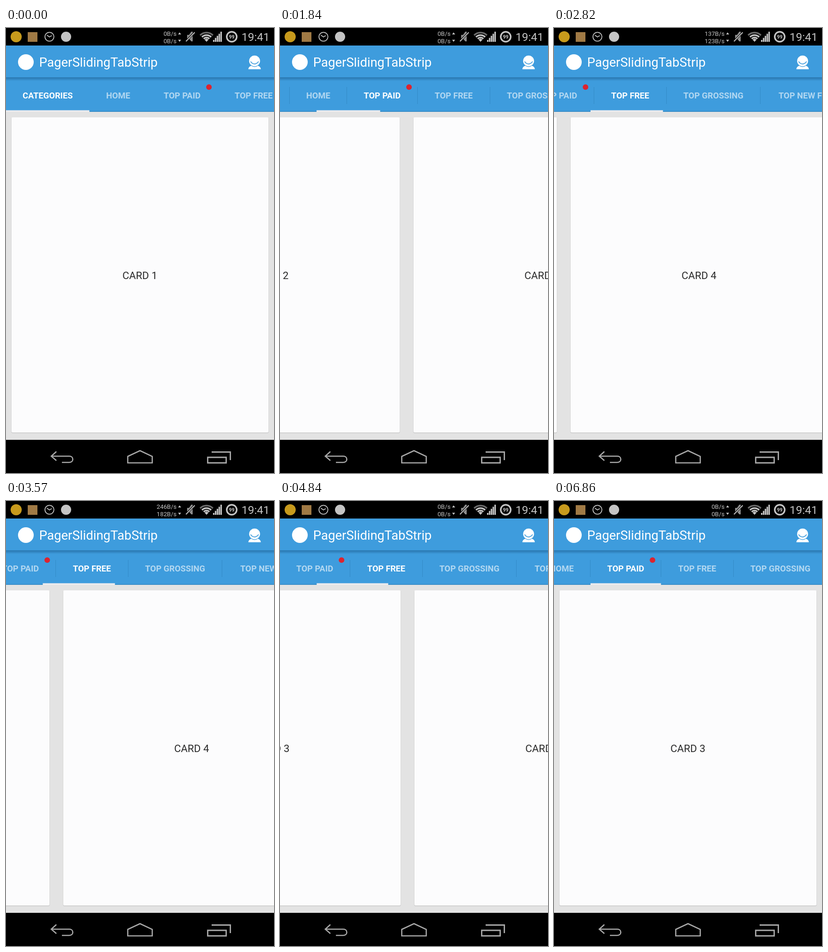
These frames come from a looping animation (580 by 966 pixels, 6920 ms). An HTML page with a canvas:

```html
<!DOCTYPE html>
<html lang="en">
<head>
<meta charset="utf-8">
<title>Sliding tabs</title>
<style>
html, body { margin: 0; width: 100%; height: 100%; overflow: hidden; background: #000; }
canvas { display: block; width: 100%; height: 100%; }
</style>
</head>
<body>
<canvas id="stage" width="580" height="966"></canvas>
<script>
const ctx = document.getElementById('stage').getContext('2d');
const W = 580, LOOP = 6920, PAGE = 586, SETTLE = 720, EDGE = 79, STRIP_LAG = 14;
const BLUE = '#3e9cdd', GREY = '#c4c4c4';
const TABS = [['CATEGORIES', 180.5], ['HOME', 124.5], ['TOP PAID', 152.5], ['TOP FREE', 157],
  ['TOP GROSSING', 203], ['TOP NEW FREE', 205], ['TOP NEW PAID', 205]];
const LEFT = [0];
TABS.forEach(([, w], i) => LEFT.push(LEFT[i] + w));

// Slow drag back from the fourth page: time, page position
const DRAG = [[3230, 3], [3570, 2.809], [4840, 2.524], [5630, 2.387], [6060, 2.312]];

const lerp = (a, b, k) => a + (b - a) * k;
const settle = (t, start) => 1 - Math.pow(1 - Math.min(1, Math.max(0, (t - start) / SETTLE)), 5);

function pageAt(t) {
  if (t < 1740) return settle(t, 1079);
  if (t < 2480) return 1 + settle(t, 1740);
  if (t < DRAG[0][0]) return 2 + settle(t, 2480);
  for (let i = 1; i < DRAG.length; i++) {
    const [t0, p0] = DRAG[i - 1], [t1, p1] = DRAG[i];
    if (t < t1) return lerp(p0, p1, (t - t0) / (t1 - t0));
  }
  return lerp(DRAG[DRAG.length - 1][1], 2, settle(t, 6060));
}

function speedAt(t) {
  if (t < 1900 || t >= 4300) return ['0B/s', '0B/s'];
  return t < 3100 ? ['137B/s', '123B/s'] : ['246B/s', '182B/s'];
}

function rect(x, y, w, h, color) {
  ctx.fillStyle = color;
  ctx.fillRect(x, y, w, h);
}

function circle(x, y, r, color) {
  ctx.fillStyle = color;
  ctx.beginPath();
  ctx.arc(x, y, r, 0, 7);
  ctx.fill();
}

function trace(points, close) {
  ctx.beginPath();
  points.forEach(([x, y]) => ctx.lineTo(x, y));
  if (close) ctx.closePath();
}

function poly(points, color) {
  trace(points, true);
  ctx.fillStyle = color;
  ctx.fill();
}

function line(points, color, width, close) {
  trace(points, close);
  ctx.strokeStyle = color;
  ctx.lineWidth = width;
  ctx.stroke();
}

function text(s, x, y, size, color, align = 'left', weight = 400) {
  ctx.font = `${weight} ${size}px Roboto, sans-serif`;
  ctx.textAlign = align;
  ctx.fillStyle = color;
  ctx.fillText(s, x, y);
}

function arc(x, y, r, from, to, color, width) {
  ctx.strokeStyle = color;
  ctx.lineWidth = width;
  ctx.beginPath();
  ctx.arc(x, y, r, from, to);
  ctx.stroke();
}

function drawStatus(t) {
  rect(0, 0, W, 38, '#000');
  circle(22, 19, 12, '#c79a1c');
  rect(47, 9, 21, 21, '#a07a45');
  arc(94, 19, 9.7, 0, 7, GREY, 1.8);
  line([[88.5, 15.5], [94, 19.5], [99, 16.5]], GREY, 1.8);
  circle(130, 19, 11, GREY);

  const [up, down] = speedAt(t);
  text(up, 369, 17, 13.3, GREY, 'right');
  text(down, 369, 32.5, 13.3, GREY, 'right');
  poly([[372.5, 14], [379, 14], [375.7, 9.5]], GREY);
  poly([[372.5, 25.5], [379, 25.5], [375.7, 30]], GREY);

  // Muted speaker
  poly([[392, 15], [396, 15], [401, 8], [404, 8], [404, 29], [401, 29], [396, 23], [392, 23]], '#8d8d8d');
  line([[389.5, 28.5], [408, 10]], '#000', 4);
  line([[389.5, 29], [408.5, 9.5]], GREY, 2);

  // Wi-Fi fan
  for (const r of [19.5, 14, 8.7]) {
    arc(434, 29.5, r, -2.36, -0.78, r > 18 ? '#6c6c6c' : GREY, 3.5);
  }
  poly([[434, 30], [429.5, 25], [434, 23], [438.5, 25]], GREY);

  for (let i = 0; i < 5; i++) rect(448 + i * 4, 26 - i * 4.5, 3.2, 4 + i * 4.5, GREY);

  arc(488.5, 19, 10.8, 0, 7, GREY, 3.4);
  text('99', 488.5, 23, 10.5, GREY, 'center', 700);
  text('19:41', 570.5, 28, 24.4, GREY, 'right');
}

function drawBar() {
  rect(0, 38, W, 70, BLUE);
  circle(43, 74, 17, '#fff');
  text('PagerSlidingTabStrip', 71.8, 84, 27.55, '#fff');

  // Profile button
  circle(538, 71.5, 11.8, '#fff');
  arc(538, 68.5, 9.5, 0.45, Math.PI - 0.45, BLUE, 1.8);
  ctx.fillStyle = '#fff';
  ctx.beginPath();
  ctx.moveTo(524.5, 89.5);
  ctx.quadraticCurveTo(525, 83.5, 531, 82);
  ctx.quadraticCurveTo(538, 87, 545, 82);
  ctx.quadraticCurveTo(551, 83.5, 551.5, 89.5);
  ctx.fill();
}

function drawTabs(t) {
  const p = pageAt(t - STRIP_LAG), i = Math.floor(p), k = p - i;
  const from = lerp(LEFT[i], LEFT[i + 1], k);
  const to = lerp(LEFT[i + 1], LEFT[i + 2], k);
  const scroll = Math.max(0, Math.floor(from - EDGE));
  const active = Math.round(pageAt(t));

  rect(0, 108, W, 74, BLUE);
  const shade = ctx.createLinearGradient(0, 107, 0, 115);
  shade.addColorStop(0, 'rgba(0,40,80,.32)');
  shade.addColorStop(0.45, 'rgba(0,40,80,.2)');
  shade.addColorStop(1, 'rgba(0,40,80,0)');
  rect(0, 107, W, 8, shade);
  rect(0, 180.5, W, 1.5, '#3287c2');
  rect(from - scroll, 178.5, to - from, 3.5, '#ececee');

  TABS.forEach(([label, w], n) => {
    const x = LEFT[n] - scroll;
    if (x > W || x + w < 0) return;
    text(label, x + w / 2, 153.3, 18.3, n === active ? '#fff' : 'rgba(255,255,255,.6)', 'center', 700);
    if (t >= 60) rect(Math.round(x + w) - 1, 128, 1, 37, '#338bc8');
    if (n === 2) circle(x + 134.2, 128.2, 6, '#dc2430');
  });
}

function drawCards(t) {
  rect(0, 182, W, 712, '#e3e3e3');
  const p = pageAt(t);
  for (let n = Math.floor(p); n <= Math.ceil(p); n++) {
    const x = Math.round((n - p) * PAGE);
    ctx.fillStyle = '#cbcbcb';
    ctx.beginPath();
    ctx.roundRect(x + 11.5, 195, 557, 684.5, 2);
    ctx.fill();
    ctx.fillStyle = '#fcfcfd';
    ctx.beginPath();
    ctx.roundRect(x + 12, 194, 556, 684, 2);
    ctx.fill();
    text('CARD ' + (n + 1), x + 289.8, 544.5, 22.3, '#2a2a2a', 'center');
  }
}

function drawNav() {
  const c = '#a9a9a9';
  rect(0, 894, W, 72, '#000');
  line([[109, 919.5], [98, 929.5], [109, 939]], c, 2.6);
  ctx.beginPath();
  ctx.moveTo(98, 929.5);
  ctx.lineTo(137, 929.5);
  ctx.bezierCurveTo(147, 929.5, 147, 943, 137, 943);
  ctx.lineTo(121, 943);
  ctx.stroke();
  line([[263.5, 930], [290, 917.5], [316.5, 930], [316.5, 944], [263.5, 944]], c, 2.6, true);
  line([[436.5, 932], [476.5, 932], [476.5, 944], [436.5, 944]], c, 2.8, true);
  line([[445, 920.5], [485.5, 920.5], [485.5, 938]], c, 2.8);
}

function draw(t) {
  drawCards(t);
  drawBar();
  drawTabs(t);
  drawStatus(t);
  drawNav();
}

let start;
function tick(now) {
  start ??= now;
  draw((now - start) % LOOP);
  requestAnimationFrame(tick);
}
requestAnimationFrame(tick);
</script>
</body>
</html>
```
